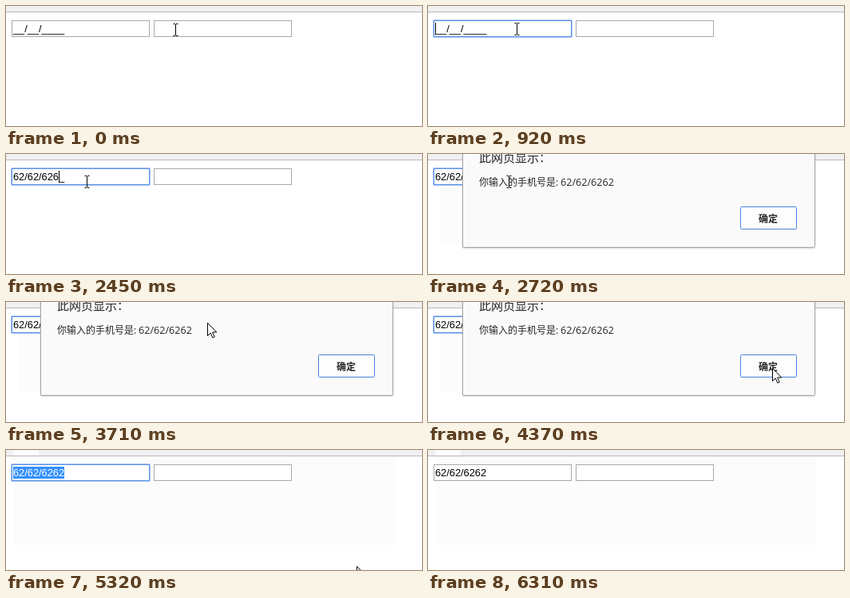
An HTML page that plays this animation: 521x151 px, repeating every 6.41 s.

```html
<!DOCTYPE html>
<html lang="zh-CN">
<head>
<meta charset="utf-8">
<title>Masked input</title>
<style>
html, body { margin: 0; width: 100%; height: 100%; overflow: hidden; background: #fff; }
svg { display: block; }
.value { font: 12.8px "Liberation Sans", Arial, sans-serif; }
.zh { font-family: "Open Sans", "Noto Sans CJK SC", "Noto Sans CJK", sans-serif; fill: #262626; }
.field { fill: #fff; stroke: #a9a9a9; }
</style>
</head>
<body>
<svg width="521" height="151" viewBox="0 0 521 151">
  <rect width="521" height="7" fill="#f0f0f0"/>
  <rect y="7" width="521" height="1" fill="#b9b9b9"/>
  <rect id="tintSmall" x="15" y="40" width="29" height="72" fill="#fcfcfc"/>
  <g id="tint">
    <rect x="9" y="8" width="478" height="112" fill="#fcfcfc"/>
    <rect x="9" width="32" height="7" fill="#fbfbfb"/>
  </g>

  <rect class="field" x="7.5" y="18.5" width="172" height="20"/>
  <rect class="field" x="185.5" y="18.5" width="172" height="20"/>
  <g id="focus" fill="none">
    <rect x="6.5" y="17.5" width="174" height="22" rx="1" stroke="#a8c5f5"/>
    <rect x="7.5" y="18.5" width="172" height="20" stroke="#5a8fe6"/>
  </g>
  <rect id="selection" x="9" y="21" width="64" height="15" fill="#3390ff"/>
  <text id="value" class="value" x="9" y="33"></text>
  <rect id="caret" y="21" width="1" height="15"/>

  <g id="dialog">
    <rect x="42.5" y="-20" width="443" height="139.5" rx="3" fill="#000" opacity=".12"/>
    <rect x="43.5" y="-20.5" width="441" height="138" rx="2" fill="#fafafa" stroke="#a6a6a6"/>
    <text class="zh" x="64" y="9.5" font-size="15">此网页显示：</text>
    <text class="zh" x="64" y="39.5" font-size="12">你输入的手机号是:<tspan id="echo" x="166" font-size="12.6"></tspan></text>
    <rect id="button" x="391.5" y="66.5" width="70" height="28" rx="1" stroke="#4783e0"/>
    <text class="zh" x="426" y="85.5" font-size="12" font-weight="700" text-anchor="middle">确定</text>
  </g>

  <path id="beam" d="M-3-7.5h2.5M.5-7.5h2.5M-3 7.5h2.5M.5 7.5h2.5M0-7V7" fill="none" stroke="#000"/>
  <path id="arrow" d="M.5.5v16l3.7-3.6 2.6 6 2.4-1-2.6-5.9h5.2z" fill="#fff" stroke="#000"/>
</svg>
<script>
const LOOP = 6410;
const FULL = "62/62/6262";
const MASK = "__/__/____";
const $ = id => document.getElementById(id);

// Each step changes only the listed properties and holds until the next.
const steps = [
  [0, { beam: [212.5, 30], arrow: null, typed: 0, caret: false, focus: false,
        selected: false, fade: 0, lift: 0, zoom: 1, pressed: false, tint: 0 }],
  [120, { beam: [196.5, 33] }],
  [250, { beam: [160.5, 36] }],
  [370, { beam: [138.5, 37] }],
  [520, { beam: [134.5, 35] }],
  [650, { beam: [131.5, 34], focus: true, caret: true }],
  [800, { beam: [120.5, 31] }],
  [920, { beam: [111.5, 29] }],
  [1080, { beam: [101.5, 35] }],
  [1220, { caret: false }],
  [1630, { caret: true }],
  [1900, { typed: 1 }],
  [2020, { typed: 3 }],
  [2170, { typed: 4 }],
  [2290, { typed: 7 }],
  [2450, { typed: 9 }],
  [2590, { typed: 10, caret: false, fade: .5, lift: -6, zoom: 1.004 }],
  [2720, { fade: 1, lift: 0, zoom: 1, tint: 1 }],
  [3710, { beam: null, arrow: [252, 26] }],
  [3830, { arrow: [370, 65] }],
  [3950, { arrow: [455, 84] }],
  [4100, { arrow: [435, 89] }],
  [4370, { arrow: [431, 83] }],
  [4650, { arrow: [427, 80], pressed: true }],
  [4800, { fade: .74, lift: -10, zoom: 1.005, selected: true, tint: 2 }],
  [4920, { fade: .3, lift: -18, zoom: 1.009 }],
  [5050, { fade: 0 }],
  [5200, { arrow: [433, 113] }],
  [5320, { arrow: [439, 146] }],
  [5470, { arrow: null }],
  [6310, { focus: false, selected: false }]
];

const show = (id, on) => $(id).setAttribute("visibility", on ? "visible" : "hidden");

function place(id, pos) {
  show(id, pos);
  if (pos) $(id).setAttribute("transform", `translate(${pos})`);
}

// Hinted advances: seven pixels per digit, four per slash.
function caretX(n) {
  return 9 + [...FULL.slice(0, n)].reduce((w, c) => w + (c === "/" ? 3.7 : 7.1), 0);
}

function draw(s) {
  $("value").textContent = FULL.slice(0, s.typed) + MASK.slice(s.typed);
  $("value").setAttribute("fill", s.selected ? "#fff" : "#000");
  $("caret").setAttribute("x", Math.round(caretX(s.typed)));
  show("caret", s.caret);
  show("focus", s.focus);
  show("selection", s.selected);
  show("tintSmall", s.tint === 1);
  show("tint", s.tint === 2);
  $("dialog").setAttribute("opacity", s.fade);
  $("dialog").setAttribute("transform",
    `translate(${264 * (1 - s.zoom)} ${s.lift}) scale(${s.zoom} 1)`);
  $("button").setAttribute("fill", s.pressed ? "#e6e6e6" : "#fdfdfd");
  place("beam", s.beam);
  place("arrow", s.arrow);
}

$("echo").textContent = FULL;
const start = performance.now();
let last = -1;

function tick() {
  const t = Math.max(0, performance.now() - start) % LOOP;
  const count = steps.filter(([at]) => at <= t).length;
  if (count !== last) {
    draw(Object.assign({}, ...steps.slice(0, count).map(step => step[1])));
    last = count;
  }
  requestAnimationFrame(tick);
}
tick();
</script>
</body>
</html>
```
